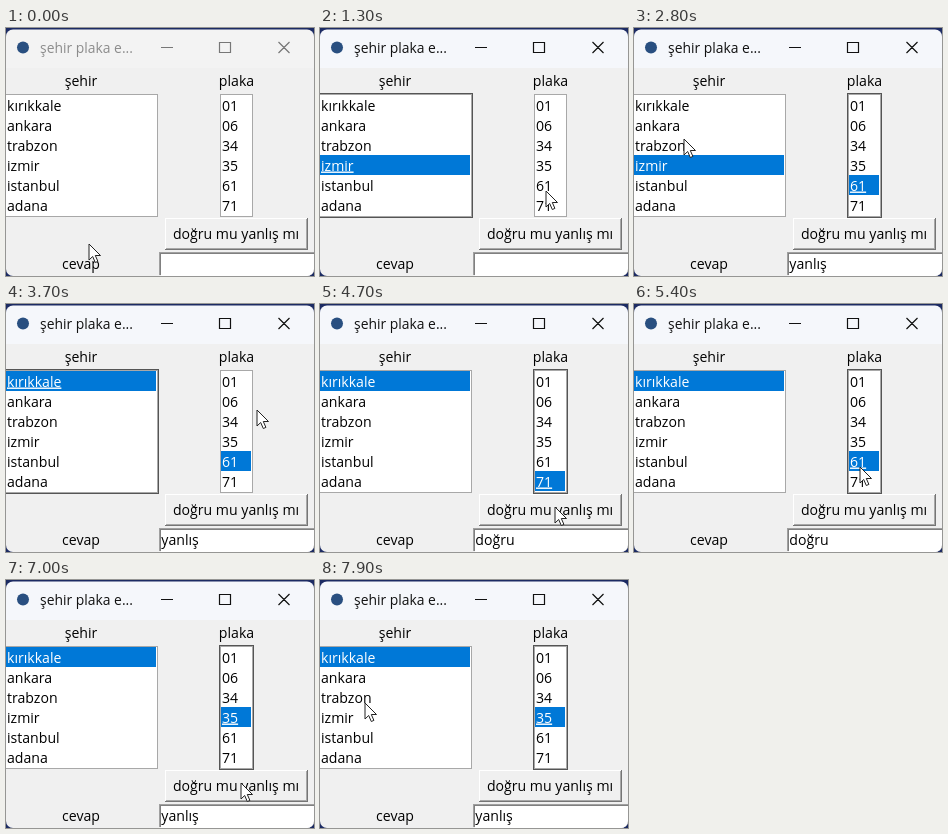
Recreate the animation shown at these times as an HTML page. Size 308 by 248 pixels, loop 8000 ms.

```html
<!DOCTYPE html>
<html lang="tr">
<head>
<meta charset="utf-8">
<style>
html, body { margin: 0; width: 100%; height: 100%; overflow: hidden; background: #1c2b63; }
svg { display: block; width: 308px; height: 248px; }
text { font: 14.1px "Open Sans", "Noto Sans", sans-serif; white-space: pre; }
#title { font-size: 13.9px; }
.mid { text-anchor: middle; }
#window rect { shape-rendering: crispEdges; }
</style>
</head>
<body>
<svg viewBox="0 0 308 248">
  <clipPath id="frame"><rect y="1.500" width="308" height="246.500" rx="7"/></clipPath>
  <g id="window" clip-path="url(#frame)">
    <rect id="bar" width="308" height="40"/>
    <rect y="40" width="308" height="208" fill="#f0f0f0"/>
    <circle cx="17" cy="19.500" r="6" fill="#294f80"/>
    <text id="title" x="34" y="25">şehir plaka e...</text>
    <path id="controls" fill="none" stroke-width="1.200"
      d="M155 19.500h12M213.500 14.500h11v10h-11zM272.500 14l11 11m0-11l-11 11"/>
    <text class="mid" x="75" y="57.500">şehir</text>
    <text class="mid" x="230.500" y="57.500">plaka</text>
    <text class="mid" x="75" y="241">cevap</text>
    <g id="lists"></g>
    <rect x="159" y="190" width="143" height="32" fill="#757575"/>
    <rect x="159" y="190" width="142" height="31" fill="#fff"/>
    <rect x="160" y="191" width="141" height="30" fill="#a8a8a8"/>
    <rect x="160" y="191" width="140" height="29" fill="#f0f0f0"/>
    <text class="mid" x="230" y="211">doğru mu yanlış mı</text>
    <rect x="153" y="224" width="155" height="23" fill="#a0a0a0"/>
    <rect x="154" y="225" width="154" height="22" fill="#808080"/>
    <rect x="155" y="226" width="153" height="22" fill="#fff"/>
    <text id="answer" x="155.300" y="241"></text>
  </g>
  <path id="cursor" d="M0 0V16L3.700 12.500 6.300 18.500 8.900 17.400 6.300 11.500H11.500Z" fill="#fff" stroke="#222"/>
</svg>
<script>
const $ = id => document.getElementById(id);
const LOOP = 8000, ROW = 20;

const codes = { kırıkkale: "71", ankara: "06", trabzon: "61", izmir: "35", istanbul: "34", adana: "01" };
const cities = Object.keys(codes);
const plates = Object.values(codes).sort();

function add(tag, attrs, label = "") {
  const el = document.createElementNS("http://www.w3.org/2000/svg", tag);
  for (const key in attrs) el.setAttribute(key, attrs[key]);
  el.textContent = label;
  return $("lists").appendChild(el);
}

function makeList(x, width, items) {
  const ring = add("rect", { x, y: 65, width, height: 125 });
  add("rect", { x: x + 1, y: 66, width: width - 2, height: 123, fill: "#a8a8a8" });
  add("rect", { x: x + 2, y: 67, width: width - 4, height: 121, fill: "#fff" });
  const mark = add("rect", { x: x + 2, width: width - 5, height: ROW, fill: "#0078d7" });
  const rows = items.map((label, i) => add("text", { x: x + 3, y: 82.5 + ROW * i }, label));

  return (selected, focused) => {
    ring.setAttribute("fill", focused ? "#555" : "#f0f0f0");
    mark.setAttribute("y", 67 + ROW * selected);
    mark.style.display = selected < 0 ? "none" : "";
    rows.forEach((row, i) => {
      row.style.fill = i === selected ? "#fff" : "#000";
      row.style.textDecoration = i === selected && focused ? "underline" : "none";
    });
  };
}

const showCities = makeList(-2, 155, cities);
const showPlates = makeList(213, 35, plates);

const spots = {
  start: () => [83, 216],
  city: row => [55, 83 + ROW * row],
  plate: row => [226, 83 + ROW * row],
  check: () => [235, 203]
};

// Clicks: time, part and row; the last lies beyond the loop
const clicks = [
  [0, "start"],
  [900, "city", 3], [1400, "plate", 4], [1900, "check"],
  [3140, "city", 0], [4290, "plate", 5], [4690, "check"],
  [5300, "plate", 4], [5900, "check"],
  [6550, "plate", 3], [7100, "check"],
  [8260, "city", 0]
];

function stateAt(t) {
  const state = { focus: "", city: -1, plate: -1, answer: "" };
  for (const [time, part, row] of clicks) {
    if (time > t) break;
    if (part === "check") {
      const right = codes[cities[state.city]] === plates[state.plate];
      state.answer = right ? "doğru" : "yanlış";
    } else if (part !== "start") {
      state.focus = part;
      state[part] = row;
    }
  }
  return state;
}

// Sideways the hand is quick and overshoots; vertically it starts slowly
const easeX = u => 1 + 3.2 * (u - 1) ** 3 + 2.2 * (u - 1) ** 2;
const easeY = u => u * u;

function pointerAt(t) {
  const next = clicks.findIndex(click => click[0] > t);
  const [t0, from, row0] = clicks[next - 1], [t1, to, row1] = clicks[next];
  const [x0, y0] = spots[from](row0), [x1, y1] = spots[to](row1);
  // Rest for a fifth of the gap at either end
  const u = Math.min(1, Math.max(0, ((t - t0) / (t1 - t0) - 0.2) / 0.6));
  return [x0 + (x1 - x0) * easeX(u), y0 + (y1 - y0) * easeY(u)].map(Math.round);
}

function draw(t) {
  const { focus, city, plate, answer } = stateAt(t);
  showCities(city, focus === "city");
  showPlates(plate, focus === "plate");
  $("answer").textContent = answer;
  $("bar").setAttribute("fill", focus ? "#f5f7fb" : "#f3f3f3");
  $("title").style.fill = focus ? "#111" : "#8c8c8c";
  $("controls").setAttribute("stroke", focus ? "#111" : "#777");
  $("cursor").setAttribute("transform", `translate(${pointerAt(t)})`);
}

const start = performance.now();
function tick() {
  draw((performance.now() - start) % LOOP);
  requestAnimationFrame(tick);
}
tick();
</script>
</body>
</html>
```
